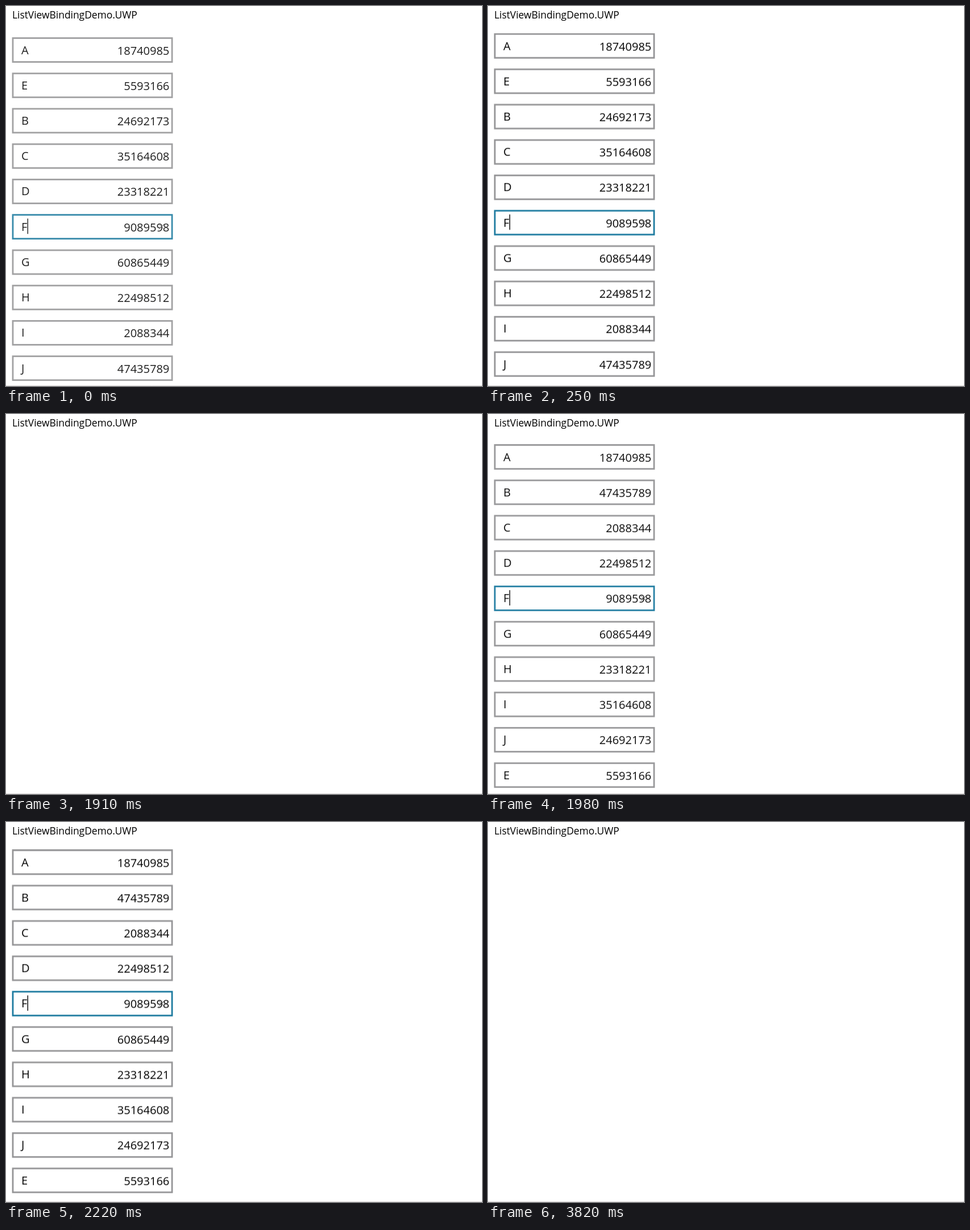
An HTML page for the animation above (3.89 s loop, 837x669 px).

```html
<!DOCTYPE html>
<html lang="en">
<head>
<meta charset="utf-8">
<title>List entrance</title>
<style>
  html, body { margin: 0; width: 100%; height: 100%; overflow: hidden; background: #fff; }
  svg { display: block; width: 837px; height: 669px; font: 20px "Open Sans", "Noto Sans", sans-serif; }
  .title { font-size: 17.4px; }
  .num { text-anchor: end; }
  .box { fill: none; stroke: #949496; stroke-width: 2.8; }
  .focus { stroke: #1c7a9f; }
  .cross { fill: none; stroke: #555; stroke-width: 1; }

  /* Ease-out slide, held between the screen updates */
  .list { opacity: 0; animation: 3890ms step-end infinite; }
  #first { animation-name: first; }
  #second { animation-name: second; }
  @keyframes first {
    0% { opacity: .88; transform: translateY(8px); }
    2.056% { opacity: 1; transform: translateY(3.7px); }
    4.113% { opacity: 1; transform: translateY(1.7px); }
    6.426% { opacity: 1; transform: translateY(.7px); }
    7.969% { opacity: 1; transform: translateY(.4px); }
    10.025% { opacity: 1; transform: none; }
    49.1%, 100% { opacity: 0; transform: none; }
  }
  @keyframes second {
    0% { opacity: 0; transform: none; }
    50.899% { opacity: .96; transform: translateY(6.1px); }
    53.213% { opacity: 1; transform: translateY(2.6px); }
    55.269% { opacity: 1; transform: translateY(1.3px); }
    57.326% { opacity: 1; transform: translateY(.6px); }
    59.125% { opacity: 1; transform: translateY(.2px); }
    61.182% { opacity: 1; transform: none; }
    98.2%, 100% { opacity: 0; transform: none; }
  }
</style>
</head>
<body>
<svg viewBox="0 0 837 669">
  <text class="title" x="11" y="22">ListViewBindingDemo.UWP</text>
  <g id="first" class="list"></g>
  <g id="second" class="list"></g>
  <path d="M0 668.5H837" stroke="#dcd8d9"/>
</svg>
<script>
  const PITCH = 62.24;
  const numbers = [18740985, 5593166, 24692173, 35164608, 23318221,
                   9089598, 60865449, 22498512, 2088344, 47435789];

  function row(letter, number, i) {
    const focused = letter === 'F';
    return `<g transform="translate(0 ${(47 + i * PITCH).toFixed(2)})">
      <rect class="box${focused ? ' focus' : ''}" x="12" y="1.5" width="280" height="42"/>
      <text x="27" y="29.5">${letter}</text>
      <text class="num" x="287.3" y="30.5">${number}</text>
      ${focused ? `<path d="M38.3 8V35" stroke="#000" stroke-width="1.4"/>
      <path class="cross" d="M268.5 17.5l10 10m0-10l-10 10"/>` : ''}
    </g>`;
  }

  function fill(id, letters, order) {
    document.getElementById(id).innerHTML =
      [...letters].map((c, i) => row(c, numbers[order[i]], i)).join('');
  }

  fill('first', 'AEBCDFGHIJ', [0, 1, 2, 3, 4, 5, 6, 7, 8, 9]);
  fill('second', 'ABCDFGHIJE', [0, 9, 8, 7, 5, 6, 4, 3, 2, 1]);
</script>
</body>
</html>
```
